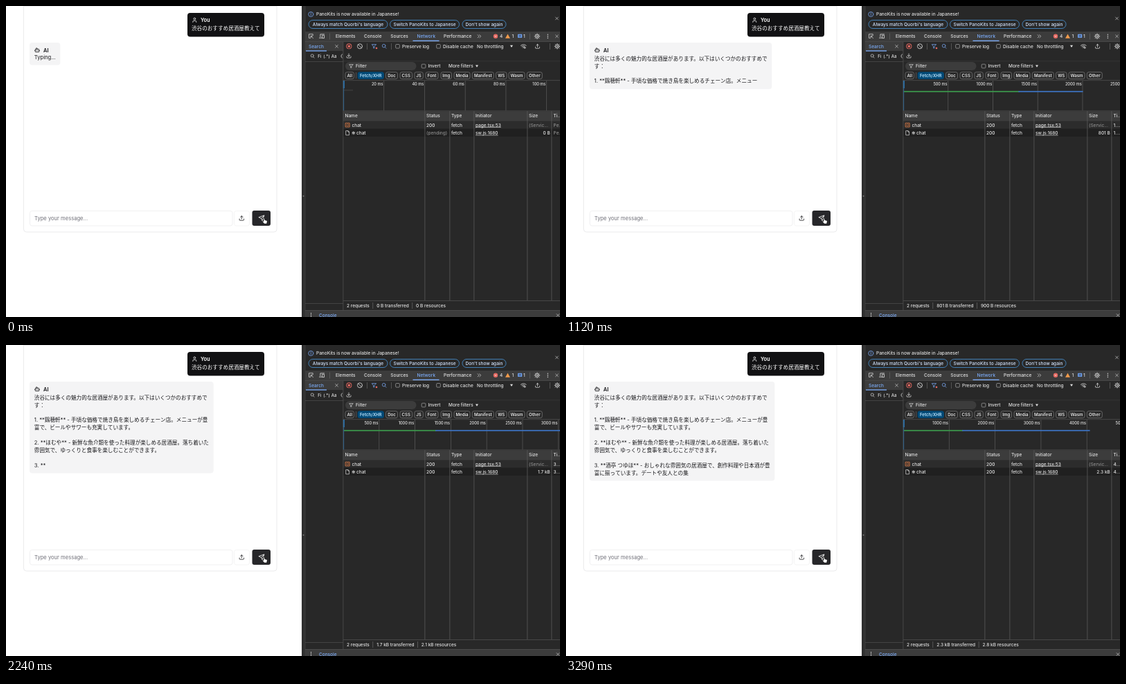
An HTML page with a canvas for the animation above (3360 ms loop, 800 px wide and 450 px high).

```html
<!DOCTYPE html>
<html lang="ja">
<head>
<meta charset="utf-8">
<style>
html, body { margin: 0; width: 100%; height: 100%; overflow: hidden; background: #fff; }
canvas { display: block; width: 800px; height: 450px; }
</style>
</head>
<body>
<canvas id="stage" width="800" height="450"></canvas>
<script>
const ctx = document.getElementById('stage').getContext('2d');
const LOOP = 3360, STEP = 70, START = 280;
const FONT = 'Inter, "Noto Sans CJK JP", "Noto Sans CJK", sans-serif';
const INK = '#e3e3e3', DIM = '#8c8c8c', BLUE = '#7cacf8', LINE = '#4f4f4f', BASE = '#282828', BAR = '#3c3c3c';

// Streamed reply: time reached, text added, bytes transferred, bytes of resources
const stream = [
  [START, '', 0, 0],
  [700, '渋谷には多くの魅力的な居酒屋があります。以下はいくつかのおすすめ', 387, 362],
  [1120, 'で\nす：\n\n1. **鶏穂軒** - 手頃な価格で焼き鳥を楽しめるチェーン店。メニュー', 801, 900],
  [1610, 'が豊\n富で、ビールやサワーも充実しています。\n\n2. **ほむや** - 新鮮', 1200, 1300],
  [2240, 'な魚介類を使った料理が楽しめる居酒屋。落ち着いた\n雰囲気で、ゆっくりと食事を楽しむことができます。\n\n3. **', 1700, 2100],
  [2660, '酒亭 つゆほ** - おしゃれな雰囲気の居酒屋で、創作料理や', 2000, 2500],
  [3290, '日本酒が豊\n富に揃っています。デートや友人との集', 2300, 2800]
];

const ICONS = {
  user: 'M19 21v-2a4 4 0 0 0-4-4H9a4 4 0 0 0-4 4v2M16 7a4 4 0 1 1-8 0a4 4 0 1 1 8 0',
  bot: 'M12 8V4H8M6 8h12a2 2 0 0 1 2 2v8a2 2 0 0 1-2 2H6a2 2 0 0 1-2-2v-8a2 2 0 0 1 2-2zM2 14h2M20 14h2M15 13v2M9 13v2',
  upload: 'M21 15v4a2 2 0 0 1-2 2H5a2 2 0 0 1-2-2v-4M17 8l-5-5-5 5M12 3v12',
  download: 'M21 15v4a2 2 0 0 1-2 2H5a2 2 0 0 1-2-2v-4M7 10l5 5 5-5M12 15V3',
  send: 'm22 2-7 20-4-9-9-4ZM22 2 11 13',
  search: 'M18 10a7 7 0 1 1-14 0a7 7 0 1 1 14 0M21 21l-5-5',
  funnel: 'M21 4H3l7 9v7h4v-7z',
  close: 'M19 5 5 19M5 5l14 14',
  gear: 'M19 12a7 7 0 1 1-14 0a7 7 0 1 1 14 0M14 12a2 2 0 1 1-4 0a2 2 0 1 1 4 0M12 1v4M12 19v4M1 12h4M19 12h4M4 4l3 3M17 17l3 3M20 4l-3 3M7 17l-3 3',
  clear: 'M22 12a10 10 0 1 1-20 0a10 10 0 1 1 20 0M5 5l14 14',
  info: 'M22 12a10 10 0 1 1-20 0a10 10 0 1 1 20 0M12 11v6M12 6v2',
  inspect: 'M20 9V3H3v17h6M11 11l10 10M11 18v-7h7',
  device: 'M6 15V4h16M2 19h11M15 8h7v12h-7z',
  wifi: 'M1 9a16 16 0 0 1 22 0M5 13a10 10 0 0 1 12-1M9 17a5 5 0 0 1 4-1M17 14v7M14 18h7',
  page: 'M5 2h9l5 5v15H5zM14 2v5h5',
  more: 'M4 5l7 7-7 7M13 5l7 7-7 7',
  dots: 'M12 3v2M12 11v2M12 19v2',
  code: 'M3 3h18v18H3zM10 8l-3 4 3 4M14 8l3 4-3 4'
};

function text(s, x, y, { size = 6.5, color = INK, weight = 500, align = 'left' } = {}) {
  ctx.font = `${weight} ${size}px ${FONT}`;
  ctx.textAlign = align;
  ctx.fillStyle = color;
  ctx.fillText(s, x, y + size * 0.36);
  return ctx.measureText(s).width;
}
function rect(x, y, w, h, color) {
  ctx.fillStyle = color;
  ctx.fillRect(x, y, w, h);
}
function box(x, y, w, h, r, fill, stroke) {
  ctx.beginPath();
  ctx.roundRect(x, y, w, h, r);
  if (fill) { ctx.fillStyle = fill; ctx.fill(); }
  if (stroke) { ctx.strokeStyle = stroke; ctx.lineWidth = 0.8; ctx.stroke(); }
}
function disc(x, y, r, color) {
  ctx.beginPath();
  ctx.arc(x, y, r, 0, 7);
  ctx.fillStyle = color;
  ctx.fill();
}
function icon(name, cx, cy, size, color = INK, weight = 2.2) {
  ctx.save();
  ctx.translate(cx - size / 2, cy - size / 2);
  ctx.scale(size / 24, size / 24);
  ctx.strokeStyle = color;
  ctx.lineWidth = weight;
  ctx.lineCap = ctx.lineJoin = 'round';
  ctx.stroke(new Path2D(ICONS[name]));
  ctx.restore();
}
function fillPath(d, x, y, fill, stroke) {
  ctx.save();
  ctx.translate(x, y);
  const path = new Path2D(d);
  ctx.fillStyle = fill;
  ctx.fill(path);
  if (stroke) { ctx.strokeStyle = stroke; ctx.lineWidth = 0.7; ctx.stroke(path); }
  ctx.restore();
}
const caret = (x, y) => fillPath('M-2-1.5h4l-2 3.2z', x, y, INK);
const checkbox = (x, y) => box(x - 2.8, y - 2.8, 5.6, 5.6, 1, null, '#9a9a9a');

function streamAt(t) {
  let reply = '', sent = 0, size = 0;
  for (let i = 1; i < stream.length; i++) {
    const [from, , sent0, size0] = stream[i - 1], [to, part, sent1, size1] = stream[i];
    const k = Math.min(1, Math.max(0, (t - from) / (to - from)));
    reply += part.slice(0, Math.round(part.length * k));
    sent += (sent1 - sent0) * k;
    size += (size1 - size0) * k;
  }
  return { reply, sent, size };
}
const bytes = n => n < 1000 ? `${Math.round(n)} B` : `${(n / 1000).toFixed(1)} kB`;

function drawChat(reply) {
  const dark = '#18181b', body = { size: 7.6, color: dark, weight: 400 }, bold = { size: 7.4, weight: 600 };
  rect(0, 0, 427, 450, '#fff');
  box(25.5, -6, 365.5, 333, 4, null, '#e6e6e8');
  rect(26, 0, 365, 0.7, '#e6e6e8');

  box(262, 10, 111, 34.5, 4, '#111113');
  icon('user', 272.3, 20.3, 8.5, '#fff');
  text('You', 281, 20.3, { ...bold, color: '#fff' });
  text('渋谷のおすすめ居酒屋教えて', 268, 32.3, { ...body, color: '#fff' });

  const lines = (reply || 'Typing...').split('\n');
  ctx.font = `400 7.6px ${FONT}`;
  const width = Math.min(271, Math.max(...lines.map(s => ctx.measureText(s).width)) + 13.5);
  const height = reply ? 34.5 + 10.9 * (lines.length - 1) : 32.5;
  box(34, 53, width, height, 4, '#f4f4f5');
  icon('bot', 45, 63.8, 8.5, dark);
  text('AI', 54, 64, { ...bold, color: dark });
  lines.forEach((s, i) => text(s, 40.8, (reply ? 76 : 74) + 10.9 * i, body));

  box(34.5, 296.5, 292.5, 21.5, 3, '#fff', '#ececee');
  text('Type your message...', 41, 307, { ...body, color: '#71717a' });
  box(329.5, 296.5, 22, 21.5, 3, '#fff', '#f1f1f2');
  icon('upload', 340.3, 307, 8.5, dark);
  box(355.5, 296, 26.5, 22, 3, '#27272a');
  icon('send', 369, 307, 9, '#fff');
  fillPath('M-2-4q1.3-.8 1.6.4l.4 2.2 2.8.8q1 .4.7 1.6l-.7 3.2H-1L-3.8.7q.2-1.1 1.3-.5l.6.5z', 373.8, 311, '#fff', '#000');
}

function drawPanelTop() {
  rect(427, 0, 373, 450, BASE);
  rect(427, 0, 5, 450, '#2f2f2f');
  rect(431.5, 0, 0.8, 450, '#454545');
  disc(429.5, 275, 1, '#777');

  icon('info', 440.3, 12, 8.5, BLUE);
  text('PanoKits is now available in Japanese!', 448, 12);
  [["Always match Quorbi's language", 437, 114], ['Switch PanoKits to Japanese', 554.5, 100], ["Don't show again", 659, 63]]
    .forEach(([label, x, w]) => {
      box(x, 20.5, w, 12, 6, null, '#4b96d8');
      text(label, x + w / 2, 26.6, { align: 'center', color: '#d3e3fd' });
    });
  icon('close', 795.5, 18, 6.5);

  rect(432, 37, 368, 14, BAR);
  icon('inspect', 440.5, 43.7, 8);
  icon('device', 456, 43.7, 8.5);
  rect(467, 39.5, 0.7, 9, '#666');
  [['Elements', 476], ['Console', 517], ['Sources', 555.3], ['Network', 593.5], ['Performance', 632]]
    .forEach(([s, x]) => text(s, x, 43.7, { color: s === 'Network' ? BLUE : INK }));
  rect(587.5, 49.7, 38, 1.3, BLUE);
  icon('more', 683.5, 43.8, 7);
  disc(707, 43.8, 3.2, '#e46962');
  icon('close', 707, 43.8, 3, '#fff', 4);
  text('4', 713, 43.8);
  fillPath('M0-3.3 3.5 3h-7z', 724.5, 43.8, '#f29b4b');
  text('1', 730.5, 43.8);
  box(739, 40.8, 6.2, 5.2, 0.8, '#6ea1f1');
  rect(740.2, 42.2, 3.8, 0.7, BASE);
  rect(740.2, 43.9, 3.8, 0.7, BASE);
  text('1', 747, 43.8);
  rect(756, 39.5, 0.7, 9, '#666');
  icon('gear', 767, 43.8, 8.5);
  icon('dots', 782.3, 43.8, 7.5, INK, 3.5);
  icon('close', 795.5, 43.8, 6.5);
  rect(432, 51, 368, 0.8, LINE);
}

function drawSidebar() {
  rect(432, 52, 55, 13, BAR);
  text('Search', 437, 58.3, { color: BLUE });
  rect(433, 64.3, 30, 1.3, BLUE);
  icon('close', 477.5, 58.3, 6.5);
  icon('search', 442.5, 72.5, 7);
  text('Fi', 450.3, 72.5, { size: 6 });
  text('(.*)', 458.3, 72.5, { size: 6 });
  text('Aa', 469.8, 72.5, { size: 6 });
  ctx.beginPath();
  ctx.arc(487, 72.5, 3, 2, 4.3);
  ctx.strokeStyle = INK;
  ctx.lineWidth = 0.8;
  ctx.stroke();
  rect(432, 80, 55, 0.7, LINE);
  rect(432, 430, 55, 0.7, LINE);
}

function drawNetworkTools() {
  rect(487, 52, 313, 388, BASE);
  disc(495.3, 58.3, 4, '#e46962');
  disc(495.3, 58.3, 3.1, BASE);
  rect(493.7, 56.7, 3.2, 3.2, '#e46962');
  icon('clear', 511, 58.3, 8.5);
  rect(521, 54, 0.7, 9, '#666');
  icon('funnel', 531.3, 58.3, 8, BLUE);
  disc(535, 61, 1.3, '#e46962');
  icon('search', 546, 58.3, 8, BLUE);
  rect(556, 54, 0.7, 9, '#666');
  checkbox(565.5, 58.3);
  text('Preserve log', 572, 58.3);
  checkbox(624.5, 58.3);
  text('Disable cache', 631, 58.3);
  text('No throttling', 680, 58.3);
  caret(730, 58.3);
  icon('wifi', 747.3, 58.3, 8.5);
  icon('upload', 767.5, 58.3, 8);
  rect(785, 54, 0.7, 9, '#666');
  icon('gear', 796, 58.3, 8.5);
  icon('download', 495, 72, 8);
  rect(487, 79.5, 313, 0.7, '#3b3b3b');

  box(490, 81, 102.5, 12, 6, BAR);
  icon('funnel', 498.3, 87, 7);
  text('Filter', 505, 87);
  checkbox(603, 87);
  text('Invert', 609.5, 87);
  text('More filters', 639, 87);
  caret(680, 87);

  [['All', 490, 12.5], ['Fetch/XHR', 508, 37.5], ['Doc', 548.5, 17], ['CSS', 569, 17.5], ['JS', 589.8, 12.5],
    ['Font', 606, 18], ['Img', 628, 15.5], ['Media', 647, 23], ['Manifest', 673.3, 31], ['WS', 707.5, 15.5],
    ['Wasm', 726, 23], ['Other', 752.3, 22]].forEach(([s, x, w], i) => {
    const on = i === 1;
    box(x, 95.7, w, 9.8, 2.5, on ? '#004a77' : null, on ? '#004a77' : '#757575');
    text(s, x + w / 2, 100.6, { size: 6.1, weight: 600, align: 'center', color: on ? '#c2e7ff' : INK });
  });
  rect(505, 96, 0.7, 9, '#666');
}

function drawTimeline(t) {
  const loading = t < START, elapsed = 880 + 0.95 * t, firstByte = 1285;
  // The visible span widens by a quarter each time the request outgrows it
  let span = 1547;
  while (span < elapsed) span *= 1.25;
  if (loading) span = 106.6;
  const scale = 313 / span;
  const step = [20, 50, 100, 200, 500, 1000].find(s => s * scale >= 40);
  rect(487, 107.3, 313, 0.8, LINE);
  for (let ms = step; ms * scale < 345; ms += step) {
    const x = 487 + ms * scale;
    rect(x - 0.4, 108, 0.8, 43.5, '#555');
    text(`${ms} ms`, x - 1.3, 113, { size: 5.6, align: 'right' });
  }
  if (loading) rect(488, 121.5, 13, 0.8, '#4a4a4a');
  else {
    rect(488, 122.9, firstByte * scale, 1.7, '#3c9a4c');
    const from = 487 + firstByte * scale, to = 487 + (elapsed + 60) * scale;
    if (to > from) rect(from, 122.9, to - from, 1.7, '#3d74c6');
  }
  rect(487.2, 108, 0.9, 43.5, '#2a78b8');
  rect(486.8, 108, 2, 11, '#2a78b8');
  rect(487, 151.5, 313, 0.8, LINE);
}

function drawTable(t, sent, size) {
  const loading = t < START, seconds = Math.floor((880 + 0.95 * t) / 1000);
  rect(487, 152.3, 313, 13.5, BAR);
  rect(487, 165.8, 313, 0.7, LINE);
  rect(487, 166.5, 313, 11.2, '#2c2c2c');
  rect(487, 177.7, 313, 11.2, '#202020');
  [604.5, 640.5, 675.5, 752.5, 787.5].forEach(x => rect(x, 152, 0.8, 274, '#5a5a5a'));
  [['Name', 489.5], ['Status', 607], ['Type', 643], ['Initiator', 678], ['Size', 755], ['Ti...', 790.5]]
    .forEach(([s, x]) => text(s, x, 159));

  icon('code', 493.3, 172.2, 7.5, '#e8804a', 2.6);
  text('chat', 499.5, 172.2);
  icon('page', 493.3, 183.7, 7.5);
  icon('gear', 501.8, 183.7, 4.6, INK, 3);
  text('chat', 506, 183.7);
  [172.2, 183.7].forEach((y, i) => {
    const waiting = i && loading;
    text(waiting ? '(pending)' : '200', 607, y, { color: waiting ? DIM : INK });
    text('fetch', 643, y);
    const w = text(i ? 'sw.js:1680' : 'page.tsx:53', 678, y);
    rect(678, y + 3.1, w, 0.6, INK);
    text(loading ? 'Pe...' : `${seconds}....`, 790.5, y, { color: loading ? DIM : INK });
  });
  text('(Servic...', 755, 172.2, { color: DIM });
  text(bytes(sent), 785.8, 183.7, { align: 'right' });

  rect(487, 426, 313, 14, BASE);
  rect(487, 426, 313, 0.8, LINE);
  let x = 492;
  ['2 requests', `${bytes(sent)} transferred`, `${bytes(size)} resources`].forEach((s, i) => {
    if (i) { rect(x + 4.6, 429, 0.7, 9, '#6a6a6a'); x += 10.3; }
    x += text(s, x, 433.6);
  });
  rect(486.5, 52, 0.8, 388, LINE);

  rect(432, 440, 368, 10, BAR);
  rect(432, 440, 368, 0.8, LINE);
  icon('dots', 440.5, 447, 7, INK, 3.5);
  text('Console', 452, 448, { color: BLUE });
  icon('close', 797, 447.5, 6.5);
}

function frame(now) {
  const t = Math.floor((now % LOOP) / STEP) * STEP;
  const { reply, sent, size } = streamAt(t);
  drawChat(reply);
  drawPanelTop();
  drawSidebar();
  drawNetworkTools();
  drawTimeline(t);
  drawTable(t, sent, size);
  requestAnimationFrame(frame);
}
requestAnimationFrame(frame);
</script>
</body>
</html>
```
